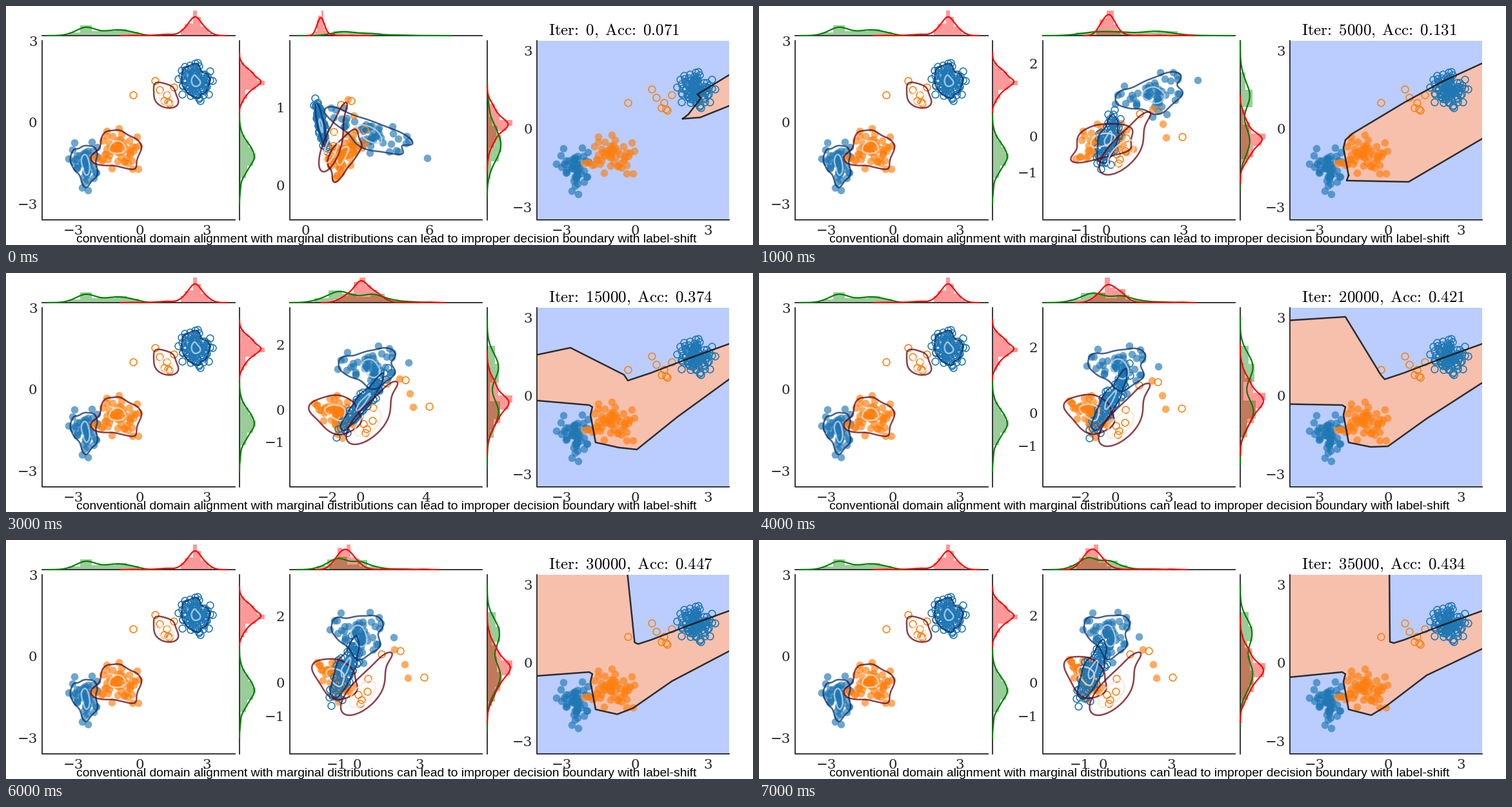
A matplotlib script that plays this animation: 1158x371 px, repeating every 8 s.

```python
import numpy as np
import matplotlib.pyplot as plt
from matplotlib.animation import FuncAnimation
from matplotlib.patches import Polygon, Rectangle

W, H, DPI = 1158, 371, 64
PX = 72 / DPI
INK = "#262626"
BLUE, ORANGE = "#1f77b4", "#ff7f0e"
BLUES, REDS = ("#08306b", "#c6dbef"), ("#67000d", "#fee5d9")
ACCURACY = (0.071, 0.131, 0.515, 0.374, 0.421, 0.465, 0.447, 0.434)
CAPTION = ("conventional domain alignment with marginal distributions can lead "
           "to improper decision boundary with label-shift")

fig = plt.figure(figsize=(W / DPI, H / DPI), dpi=DPI, facecolor="white")
ax = fig.add_axes([0, 0, 1, 1])
ax.set(xlim=(0, W), ylim=(H, 0))
ax.axis("off")

rng = np.random.default_rng(7)


def normal_cloud(n, reach):
    """Standard normal points, pulled inside a radius and recentred."""
    z = rng.normal(size=(n, 2))
    r = np.hypot(*z.T)[:, None]
    z *= np.minimum(1, reach / r)
    return (z - z.mean(0)) / z.std(0)


def place(cloud, z):
    """Scale, turn and move points; a cloud is (x, y, sx, sy, degrees)."""
    x, y, sx, sy, deg = cloud
    c, s = np.cos(np.radians(deg)), np.sin(np.radians(deg))
    return np.asarray(z) * (sx, sy) @ np.array([[c, s], [-s, c]]) + (x, y)


SHAPE = dict(blue=normal_cloud(52, 2.5), orange=normal_cloud(54, 2.2),
             ring=normal_cloud(105, 2.3))
BLUE_FAR = ((3.2, 0.2), (2.0, -1.1), (-2.2, -1.3))
# The rare class keeps its shape in the latent space, next to a few stray points.
FEW = ((94, -27), (57, -68), (28, -63), (7, -25), (6, -5), (-3, 8), (-5, 14), (-8, 0))
STRAY = ((64, -47), (69, -26), (48, -70))

INPUT = {name: place(cloud, SHAPE[name]) for name, cloud in dict(
    blue=(882, 252, 11, 15.5, 0), orange=(938, 232, 19, 14, 5),
    ring=(1069, 129, 11.8, 12, 0)).items()}
INPUT["few"] = np.array([(964, 150), (1001, 129), (1008, 142), (1020, 150),
                         (1016, 158), (1023, 160), (1025, 162), (1032, 138)])

# View: pixel of zero and pixels per unit, for x and y.
scenes = {
    0: dict(view=(464, 32, 278, 121), blue=(562, 197, 31, 11, 22),
            orange=(524, 231, 18, 9, -55), ring=(488, 184, 17, 2.5, 77),
            few=(504, 222, 0.55, 1.1, 0)),
    1: dict(view=(538, 40, 202, 56.5), blue=(610, 138, 23, 14, -20),
            orange=(533, 211, 22, 13, -15), ring=(541, 208, 19, 7, -78),
            few=(562, 230, 1, 1, 0)),
    2: dict(view=(562, 29.8, 234, 55), blue=(582, 155, 22, 16, 20),
            orange=(525, 236, 18, 12, 45), ring=(558, 200, 27, 5, -65),
            few=(570, 254, 1, 1, 0)),
    3: dict(view=(549.5, 25.4, 212, 50.4), blue=(564, 147, 19, 15, -10),
            orange=(512, 219, 17, 11, 45), ring=(552, 202, 27, 5, -54),
            few=(562, 234, 1, 1, 0)),
    5: dict(view=(556, 29.2, 222, 51.4), blue=(552, 148, 19, 17, 0),
            orange=(515, 217, 17, 10, 52), ring=(535, 196, 26, 6.5, -71),
            few=(560, 240, 1, 1, 0)),
    7: dict(view=(533, 35.3, 221, 52), blue=(541, 147, 15, 17, 0),
            orange=(507, 212, 17, 9, 62), ring=(517, 203, 24, 7, -70),
            few=(547, 240, 1, 1, 0)),
}

# The warm region: a crest on the left that meets a shared ridge,
# and a floor that runs through a shared lip.
RIDGE = [(1000, 155), (1060, 132), (1121, 110)]
LIP = [(904, 205), (909, 208), (906, 220), (914, 263)]


def border(crest, start, floor):
    return np.array(crest + RIDGE, float), np.array([start] + LIP + floor, float)


borders = {
    0: (np.array([(1049, 175), (1058, 168), (1077, 143), (1072, 137), (1121, 107)]),
        np.array([(1049, 175), (1076, 173), (1121, 155)])),
    1: (np.array(LIP[:0:-1] + [(920, 198), (1000, 150), (1060, 117), (1121, 89)]),
        np.array([LIP[-1], (911, 271), (1007, 273), (1121, 206)])),
    2: border([(823, 187), (850, 159), (917, 110), (943, 121), (964, 167)],
              (823, 190), [(945, 270), (993, 276), (1050, 242), (1121, 204)]),
    3: border([(823, 127), (875, 116), (958, 158), (964, 167)],
              (823, 198), [(950, 271), (978, 274), (1040, 224), (1121, 165)]),
    5: border([(823, 20), (943, 20), (971, 160), (976, 163)],
              (823, 209), [(946, 269), (972, 264), (1030, 228), (1121, 176)]),
    7: border([(823, 20), (977, 20), (978, 158), (984, 160)],
              (823, 213), [(949, 272), (972, 258), (1035, 210), (1121, 169)]),
}

for mid in (4, 6):
    a, b = scenes[mid - 1], scenes[mid + 1]
    scenes[mid] = {k: np.add(a[k], b[k]) / 2 for k in a}
    borders[mid] = [(p + q) / 2 for p, q in zip(borders[mid - 1], borders[mid + 1])]


def latent_points(scene):
    pts = {name: place(scene[name], z) for name, z in SHAPE.items()}
    pts["blue"] = np.vstack([pts["blue"], place(scene["blue"], BLUE_FAR)])
    pts["orange"] = np.vstack([pts["orange"], place(scene["few"], STRAY)])
    pts["few"] = place(scene["few"], FEW)
    return pts


def line(xy, color, width, **kw):
    x, y = np.asarray(xy, float).T
    return ax.plot(x, y, color=color, lw=width * PX, solid_joinstyle="round", **kw)


def scatter(pts):
    out = []
    for name, color in (("blue", BLUE), ("orange", ORANGE)):
        out += ax.plot(*pts[name].T, "o", ms=11.6 * PX, color=color, mec="none",
                       alpha=0.65, zorder=3)
    for name, color in (("ring", BLUE), ("few", ORANGE)):
        out += ax.plot(*pts[name].T, "o", ms=10.8 * PX, mfc="none", mec=color,
                       mew=1.6 * PX, zorder=4)
    return out


def density_loops(p, colors, outer):
    """Two level lines of a Gaussian density estimate with Scott's bandwidth."""
    inv = np.linalg.inv(np.cov(p.T) * len(p) ** (-1 / 3))
    lo, hi = p.min(0) - 30, p.max(0) + 30
    x, y = np.meshgrid(*(np.linspace(a, b, 80) for a, b in zip(lo, hi)))
    d = np.stack([x, y], -1)[:, :, None] - p
    z = np.exp(-0.5 * np.einsum("ijkm,mn,ijkn->ijk", d, inv, d)).sum(-1)
    return ax.contour(x, y, z / z.max(), levels=[outer, 0.75], colors=colors,
                      linewidths=2.5 * PX, alpha=0.75, zorder=5)


def all_loops(pts):
    return [density_loops(pts[name], colors, outer) for name, colors, outer in (
        ("blue", BLUES, 0.2), ("orange", REDS, 0.2),
        ("ring", BLUES, 0.2), ("few", REDS, 0.45))]


def density(values, t):
    """Density curve, cut three bandwidths beyond the data."""
    bw = values.std() * len(values) ** -0.2
    h = np.exp(-0.5 * ((t[:, None] - values) / bw) ** 2).sum(1)
    h /= len(values) * bw * np.sqrt(2 * np.pi)
    h[(t < values.min() - 3 * bw) | (t > values.max() + 3 * bw)] = np.nan
    return h


def margin(pts, axis, base, lo, hi):
    """Histograms and curves of both domains, scaled to a common peak."""
    def orient(t, h):
        return np.stack([base + h, t] if axis else [t, base - h], 1)

    t = np.linspace(lo, hi, 300)
    rows = []
    for names, color in ((("blue", "orange"), "green"), (("ring", "few"), "red")):
        values = np.concatenate([pts[n][:, axis] for n in names])
        rows.append((color, *np.histogram(values, "fd", density=True), density(values, t)))
    scale = 39 / max(max(bars.max(), np.nanmax(h)) for _, bars, _, h in rows)
    out = []
    for color, bars, edges, h in rows:
        steps = np.concatenate([[0], np.repeat(bars, 2), [0]]) * scale
        out.append(ax.add_patch(Polygon(orient(np.repeat(edges, 2), steps), fc=color,
                                        alpha=0.4, lw=0, zorder=1)))
        out += line(orient(t, h * scale), color, 2.2, zorder=2)
    return out


def joint_plot(pts, x0, x1, side):
    return (scatter(pts) + all_loops(pts) + margin(pts, 0, 46, x0, x1)
            + margin(pts, 1, side, 54, 332))


def label(x, y, value, ha="center"):
    return ax.text(x, y + 7.8, str(value).replace("-", "\u2212"), ha=ha, va="baseline",
                   family="DejaVu Serif", size=21.3 * PX, color=INK, zorder=6)


def tick_labels(view, xs, ys, right):
    x0, sx, y0, sy = view
    return ([label(x0 + sx * v, 347, v) for v in xs]
            + [label(right, y0 - sy * v, v, "right") for v in ys])


def title(i):
    colon, comma = r"\hspace{-0.2}:\hspace{0.306}", r",\hspace{0.275}"
    text = rf"$\mathrm{{Iter{colon}{5000 * i}{comma}Acc{colon}{ACCURACY[i]:.3f}}}$"
    return ax.text(841, 45, text, math_fontfamily="cm", size=25 * PX,
                   va="baseline", color="black")


def draw_border(upper, lower):
    region = Polygon(np.vstack([upper, lower[::-1]]), fc="#f6c0ad", lw=0, zorder=1)
    out = [ax.add_patch(region)]
    for edge in (upper, lower):
        out += line(edge, "#111111", 2.5, alpha=0.85, zorder=5)
    for artist in out:
        artist.set_clip_path(panel)
    return out


def draw_static():
    for x0, x1 in ((56, 354.5), (440, 737.5), (823, 1121)):
        line([(x0, 54), (x0, 332), (x1, 332)], INK, 1.8, zorder=6)
    for x0, x1, side in ((56, 354.5, 362), (440, 737.5, 746)):
        line([(x0, 46), (x1, 46)], INK, 1.8, zorder=2)
        line([(side, 54), (side, 332)], INK, 1.8, zorder=2)

    left, right = np.array([207.5, 34.5, 180.5, 42.2]), np.array([975, 37.8, 190.5, 40.4])
    tick_labels(left, (-3, 0, 3), (-3, 0, 3), 48.5)
    tick_labels(right, (-3, 0, 3), (-3, 0, 3), 816)
    zoom = (left / right)[1::2]
    joint_plot({k: (p - right[::2]) * zoom + left[::2] for k, p in INPUT.items()},
               56, 354, 362)
    scatter(INPUT)
    ax.text(590, 367, CAPTION, ha="center", va="baseline", family="Liberation Sans",
            size=19.26 * PX, color="black", zorder=8)


panel = ax.add_patch(Rectangle((823, 54), 298, 278, fc="#bacdfe", lw=0, zorder=0))
draw_static()
live = []


def update(i):
    while live:
        live.pop().remove()
    x_ticks = {0: (0, 6), 3: (-2, 0, 4)}.get(i, (-1 if i in (1, 6, 7) else -2, 0, 3))
    y_ticks = (-1, 0, 2) if i else (0, 1)
    live.extend(joint_plot(latent_points(scenes[i]), 440, 737, 746))
    live.extend(tick_labels(scenes[i]["view"], x_ticks, y_ticks, 432))
    live.extend(draw_border(*borders[i]))
    live.append(title(i))
    return live


anim = FuncAnimation(fig, update, frames=8, init_func=lambda: update(0),
                     interval=1000, repeat=True, repeat_delay=0, blit=False)
plt.show()
```
